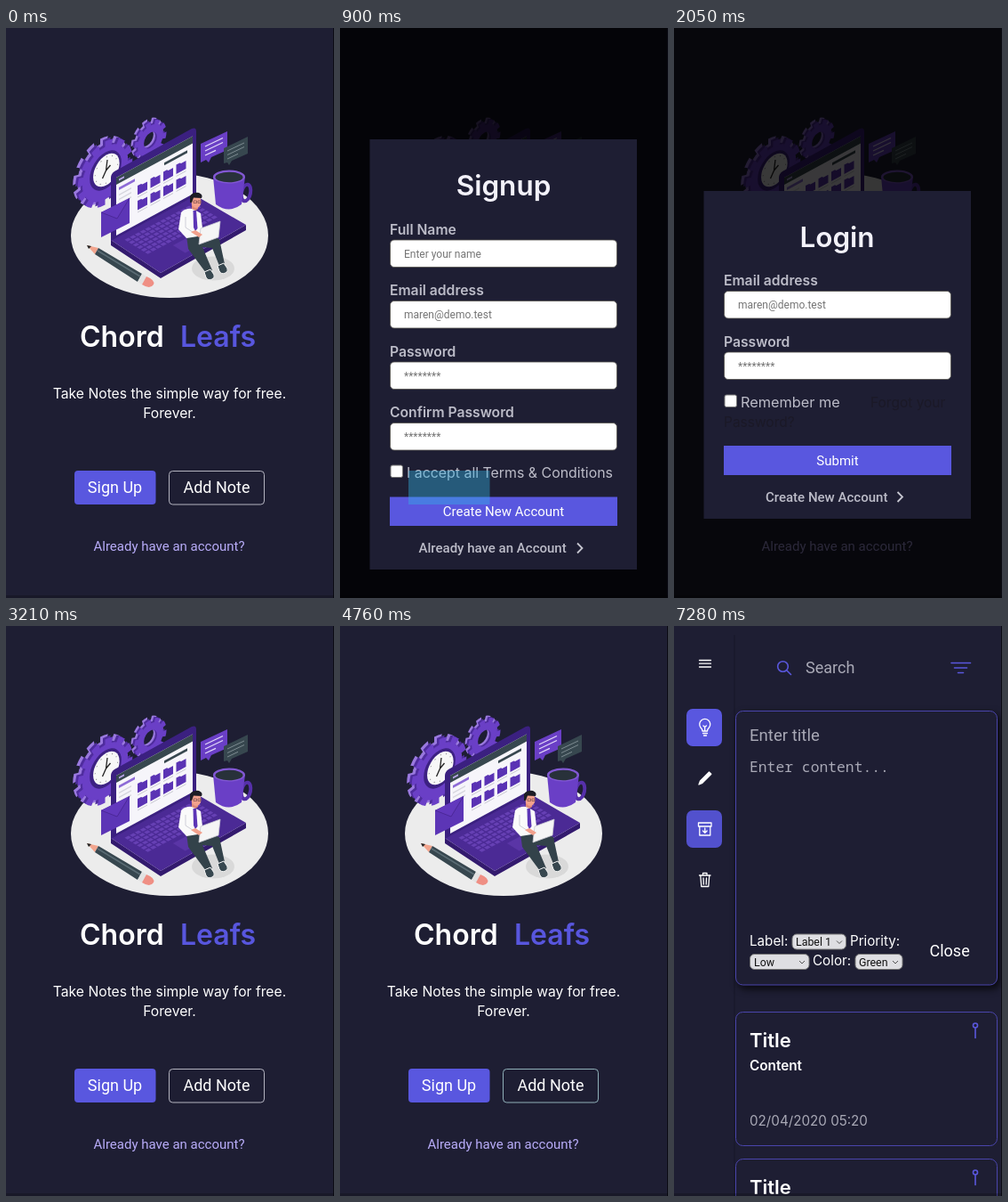
Animation of 369 by 640 pixels, one loop 8000 ms. Source, as an HTML page:

```html
<!DOCTYPE html>
<html lang="en">
<head>
<meta charset="utf-8">
<title>Notes app walkthrough</title>
<style>
html, body { margin: 0; height: 100%; overflow: hidden; background: #1e1e33; }
svg { display: block; width: 100vw; height: 100vh; }
text { font-family: Roboto, sans-serif; fill: #fff; white-space: pre; }
.in { font-family: Inter, sans-serif; }
.b { font-weight: 600; }
.m { font-weight: 500; }
.mid { text-anchor: middle; }
.soft text { fill: #bcbcc8; }
.soft .head { fill: #f3f2fa; font-size: 31.5px; }
.soft .label { font-size: 15.7px; }
.soft .hint { fill: #757575; font-size: 12px; }
.soft .btn { fill: #fff; font-size: 15px; }
.soft .faint { fill: #1b1927; font-size: 15.5px; }
.link { font-size: 15px; }
.card { fill: #1e1e33; stroke: #4a45ac; }
.lift { filter: drop-shadow(3px 4px 4px #000b); }
.line { fill: none; stroke: #fff; stroke-width: 1.3; stroke-linecap: round; stroke-linejoin: round; }
.accent { stroke: #5a57dd; stroke-width: 1.6; }
.opt { font-size: 12.4px; fill: #111; }

/* 8 s timeline; 1% is 80 ms */
.t { animation: 8s step-end infinite; opacity: 0; }
#dim { animation-name: dim; }
#signup { animation-name: signup; }
#login { animation-name: login; }
#tapSign { animation-name: tapSign; }
#tapAdd { animation-name: tapAdd; }
#addBox { animation: addBox 8s step-end infinite; }
#page { animation-name: page; }
#plain { animation-name: plain; }
#icons { animation-name: icons; }
#bar { animation-name: bar; }
#archive { animation-name: archive; }
@keyframes dim {
  11.25% { opacity: .85; animation-timing-function: steps(4); }
  15.25% { opacity: .77; }
  40.125% { opacity: 0; }
}
@keyframes signup { 11.25% { opacity: 1; } 25.625% { opacity: 0; } }
@keyframes login { 25.625% { opacity: 1; } 40.125% { opacity: 0; } }
@keyframes tapSign {
  11.25% { opacity: 1; animation-timing-function: steps(4); }
  15.25% { opacity: 0; }
}
@keyframes tapAdd {
  54.5% { opacity: 1; }
  55.5% { opacity: 1; animation-timing-function: steps(4); }
  59.5% { opacity: 0; }
}
@keyframes addBox { 59.5% { stroke: #9cc0c8; } 74% { stroke: #c4c4d0; } }
@keyframes page { 74% { opacity: 1; } 100% { opacity: 1; } }
@keyframes plain { 74% { opacity: 1; } 76% { opacity: 0; } }
@keyframes icons { 76% { opacity: 1; } 100% { opacity: 1; } }
@keyframes bar { 74% { opacity: 1; } 80% { opacity: .5; } 82% { opacity: 0; } }
@keyframes archive {
  85% { opacity: 0; animation-timing-function: steps(6); }
  91%, 100% { opacity: .9; }
}
</style>
</head>
<body>
<svg viewBox="0 0 369 640" preserveAspectRatio="none">
  <defs>
    <rect id="field" x="56.5" width="255" height="30.5" rx="4.5" fill="#fff" stroke="#55524c" stroke-width=".8"/>
    <rect id="check" x="57" width="13.5" height="13.5" rx="2" fill="#fff" stroke="#767676"/>
    <path id="go" d="M0 0l5.5 5.5-5.5 5.5" fill="none" stroke="#c6c6d0" stroke-width="1.8"/>
    <path id="down" d="M0 0l3 3 3-3" fill="none" stroke="#555"/>
    <g id="bigGear">
      <circle r="29"/>
      <circle r="31.5" fill="none" stroke-width="8" pathLength="24" stroke-dasharray="1.1 .9"/>
    </g>
    <g id="ringGear" fill="none">
      <circle r="12.500" stroke-width="8"/>
      <circle r="18" stroke-width="5.500" pathLength="20" stroke-dasharray="1.1 .9"/>
    </g>
    <path id="folder" d="M0 1h4l1.5 1.5h5.5v9h-11z" fill="#5a33b4"/>
    <path id="shoe" d="M0 2l7-3 4 6q1 3-2 5-5 2-7-2z" fill="#37474f" stroke="#f4f4f4"/>
    <g id="note">
      <rect class="card" x="69.5" y="433.5" width="294" height="150" rx="8"/>
      <text class="in b" x="85" y="473" font-size="22">Title</text>
      <text class="in b" x="85" y="499" font-size="15.3">Content</text>
      <text class="in" x="85" y="561" font-size="15.2" style="fill:#a9a9b6">02/04/2020 05:20</text>
    </g>
    <g id="pin" class="line accent"><circle cx="339" cy="448.5" r="2.5"/><path d="M339 451v11.5"/></g>
    <clipPath id="rail"><path d="M0 0h54v640h-54z"/></clipPath>
  </defs>

  <rect width="369" height="640" fill="#1e1e33"/>

  <g id="art">
    <ellipse cx="184" cy="233" rx="111" ry="70" fill="#ececec"/>

    <!-- gears share the slanted plane of the screen -->
    <g fill="#9a79df" stroke="#9a79df">
      <use href="#bigGear" transform="matrix(.87 -.47 0 1 106 160)"/>
      <use href="#ringGear" transform="matrix(.87 -.47 0 1 158.500 123.500)"/>
    </g>
    <g fill="#4f2c9e" stroke="#4f2c9e">
      <use href="#bigGear" transform="matrix(.87 -.47 0 1 109 161.500)"/>
      <use href="#ringGear" transform="matrix(.87 -.47 0 1 160.500 125)"/>
    </g>
    <g fill="#6a3fc6" stroke="#6a3fc6">
      <use href="#bigGear" transform="matrix(.87 -.47 0 1 111.500 163)"/>
      <use href="#ringGear" transform="matrix(.87 -.47 0 1 162.500 126)"/>
    </g>
    <g transform="matrix(.87 -.47 0 1 112 160)">
      <circle r="20.500" fill="#3d2183"/>
      <circle cx="1" r="17" fill="#f7f7f7"/>
      <circle cx="1" r="14.500" fill="none" stroke="#777" pathLength="24" stroke-dasharray=".3 1.7"/>
    </g>
    <path d="M114 148l-1.500 12-4 9M112.500 160l5-6" fill="none" stroke="#222" stroke-width="1.3"/>

    <path d="M118 238L174 275V281L118 244zM174 275L270 221V227L174 281z" fill="#331a6e"/>
    <path d="M118 238L213 188 270 221 174 275z" fill="#4b2a95"/>
    <g transform="matrix(.95 -.5 .57 .35 118 238)">
      <path d="M9 15H92M9 23H92M9 31H92M9 39H92M9 47H92M9 55H92" stroke="#6640b4" stroke-width="5.5" stroke-dasharray="4.500 1.500"/>
      <path d="M34 66h34v24h-34z" fill="#5a35a6"/>
    </g>
    <path d="M118 168Q118 164 122 161L209 113Q214 111 214 116V188L118 239z" fill="#3b2080"/>
    <g transform="matrix(1 -.54 0 1 124 168)">
      <path d="M0 0h86v65h-86z" fill="#f6f5fa"/>
      <path d="M0 0h86v8h-86z" fill="#37474f"/>
      <path d="M3 4h6" stroke="#b9a5e8" stroke-width="2"/>
      <path d="M3 14h18" stroke="#8d6bd6" stroke-width="3"/>
      <path d="M54 14h26" stroke="#37474f" stroke-width="3"/>
      <path d="M3 21h14M3 26h14M3 31h14" stroke="#d5d5dd" stroke-width="1.5"/>
      <use href="#folder" x="24" y="21"/><use href="#folder" x="38.5" y="21"/>
      <use href="#folder" x="53" y="21"/><use href="#folder" x="67.5" y="21"/>
      <use href="#folder" x="24" y="38"/><use href="#folder" x="38.5" y="38"/>
      <use href="#folder" x="53" y="38"/><use href="#folder" x="67.5" y="38"/>
      <path d="M24 35h55M24 52h55" stroke="#c8c8d0" stroke-dasharray="11 3.5"/>
    </g>
    <path d="M107 207L139 191V219L107 235z" fill="#5c35b6"/>
    <path d="M107 207L125 214 139 191" fill="#6238bd" stroke="#472590" stroke-width=".8"/>

    <path d="M219 130L249 116V137L231 145 228 151 225 148 219 151z" fill="#6a3fc6"/>
    <path d="M224 133l20-9.5M224 138l20-9.5M224 143l12-5.700" stroke="#e2d8f8" stroke-width="1.3"/>
    <path d="M245 135L272 122V141L254 149 251 154 249 151 245 152z" fill="#37474f"/>
    <path d="M249 138l19-9M249 142.5l19-9M249 147l12-5.700" stroke="#7d8b91"/>

    <ellipse cx="270" cy="185" rx="5" ry="9.5" transform="rotate(12 270 185)" fill="none" stroke="#5630aa" stroke-width="4"/>
    <path d="M233 167L236 198Q251 209 265 198L269 167z" fill="#6a3fc6"/>
    <ellipse cx="251" cy="167" rx="18" ry="7.5" fill="#8258d4"/>
    <ellipse cx="251" cy="167.500" rx="15.5" ry="5.8" fill="#28313a"/>

    <path d="M91 244L104 247 100 254z" fill="#f2a58e"/>
    <path d="M91 244l5 1-3 3z" fill="#222"/>
    <path d="M104 247L153 276 148 285 100 254z" fill="#37474f"/>
    <path d="M103 250L151 279" stroke="#5b6d75" stroke-width="1.5"/>
    <path d="M153 276l5 3-5 9-5-3z" fill="#e2e2e2"/>
    <path d="M158 279Q168 283 166 288 162 294 153 288z" fill="#ef8f84"/>

    <ellipse cx="233" cy="270" rx="24" ry="13.5" fill="#d9d9d9"/>
    <path d="M203 233L222 231 240 237 246 265 240 267 232 247 221 246 232 272 225 275 205 248z" fill="#33424a"/>
    <use href="#shoe" x="238" y="265"/><use href="#shoe" x="223" y="272"/>
    <path d="M197 207Q202 202 210 203L219 208 222 233 203 236 194 226z" fill="#fafafa"/>
    <path d="M202 212L202 224 213 231" fill="none" stroke="#cfcfd8"/>
    <path d="M210.500 205l3.500 0 1.500 20-2.500 3-2-4z" fill="#5c35b6"/>
    <path d="M209 198h7v5l-3 2-4-2z" fill="#dd8878"/>
    <ellipse cx="214" cy="195" rx="5.5" ry="7" fill="#f2a18d"/>
    <path d="M207 196V189Q210 184 217 185 222 187 220 191L211 190.500 209 196z" fill="#1c1c24"/>
    <path d="M211 194h3.500v2.500h-3.500zM216 194h3v2.500h-3z" fill="none" stroke="#4a2a30" stroke-width=".5"/>
    <path d="M219 225L241 217 239 235 217 243z" fill="#f5f5f5" stroke="#c9c9d2" stroke-width=".8"/>
    <path d="M208 229l9 6 4-3-8-5z" fill="#f2a18d"/>
  </g>

  <text class="in b" x="83" y="358" font-size="32">Chord</text>
  <text class="in b" x="196" y="358" font-size="32" style="fill:#5856de">Leafs</text>
  <g class="mid" font-size="15.7">
    <text class="in" x="184" y="416">Take Notes the simple way for free.</text>
    <text class="in" x="184" y="438">Forever.</text>
  </g>
  <rect x="77" y="497" width="91.5" height="38" rx="4" fill="#5957df"/>
  <rect id="addBox" x="183.5" y="497.5" width="107" height="37.5" rx="4" fill="none" stroke="#c4c4d0" stroke-width=".9"/>
  <g class="mid">
    <text x="122.5" y="522" font-size="18">Sign Up</text>
    <text x="237" y="522" font-size="18">Add Note</text>
    <text class="link" x="183.5" y="587" style="fill:#b8acf8">Already have an account?</text>
  </g>
  <rect id="tapAdd" class="t" x="183" y="497" width="108" height="38" fill="#33b5e5" fill-opacity=".4"/>

  <rect id="dim" class="t" width="369" height="640"/>

  <g id="signup" class="t soft">
    <path d="M33.5 125h300.5v483h-300.5z" fill="#1e1e33"/>
    <text class="in b head mid" x="184" y="188">Signup</text>
    <text class="in b label" x="56" y="231.5">Full Name</text>
    <text class="in b label" x="56" y="300">Email address</text>
    <text class="in b label" x="56" y="368.5">Password</text>
    <text class="in b label" x="56" y="437">Confirm Password</text>
    <use href="#field" y="238"/><use href="#field" y="306.5"/>
    <use href="#field" y="375"/><use href="#field" y="443.5"/>
    <text class="hint" x="72" y="257.5">Enter your name</text>
    <text class="hint" x="72" y="326">maren@demo.test</text>
    <text class="hint" x="72" y="394.5">********</text>
    <text class="hint" x="72" y="463">********</text>
    <use href="#check" y="491"/>
    <text class="in" x="75" y="505" font-size="15.9">I accept all Terms &amp; Conditions</text>
    <path d="M56 526.5h256v32.5h-256z" fill="#5957df"/>
    <text class="btn mid" x="184" y="548">Create New Account</text>
    <text class="link m" x="88.5" y="589">Already have an Account</text>
    <use href="#go" x="267" y="578.5"/>
  </g>

  <g id="login" class="t soft">
    <path d="M33.5 183h300.5v368h-300.5z" fill="#1e1e33"/>
    <text class="in b head mid" x="183.5" y="245.5">Login</text>
    <text class="in b label" x="56" y="289">Email address</text>
    <text class="in b label" x="56" y="357.5">Password</text>
    <use href="#field" y="295.5"/><use href="#field" y="364"/>
    <text class="hint" x="72" y="315">maren@demo.test</text>
    <text class="hint" x="72" y="383.5">********</text>
    <use href="#check" y="412"/>
    <text class="in" x="75" y="426" font-size="16.3">Remember me</text>
    <text class="in faint" x="221" y="426">Forgot your</text>
    <text class="in faint" x="56" y="448">Password?</text>
    <path d="M56 469h256v33h-256z" fill="#5957df"/>
    <text class="btn mid" x="184" y="491">Submit</text>
    <text class="link m" x="103" y="532">Create New Account</text>
    <use href="#go" x="251.5" y="521"/>
  </g>

  <rect id="tapSign" class="t" x="77" y="497" width="91.5" height="38" fill="#33b5e5" fill-opacity=".4"/>

  <g id="page" class="t">
    <rect width="369" height="640" fill="#1e1e33"/>
    <path d="M67 10h2v630h-2z" fill="#1a1a2d"/>
    <rect class="card lift" x="69.5" y="95.5" width="294" height="307.5" rx="8"/>
    <text x="85" y="128.5" font-size="18.6" style="fill:#a9a9b6">Enter title</text>
    <text x="85" y="163.5" font-size="16.35" style="fill:#a9a9b6;font-family:'Noto Sans Mono',monospace">Enter content...</text>
    <g font-size="15.2">
      <text class="in" x="85" y="359">Label:</text>
      <text class="in" x="198" y="359">Priority:</text>
      <text class="in" x="156" y="381">Color:</text>
    </g>
    <g fill="#dedee2" stroke="#777">
      <rect x="133" y="346" width="60.5" height="17" rx="5"/>
      <rect x="85.5" y="368.5" width="66.5" height="17" rx="5"/>
      <rect x="204" y="368.5" width="53" height="17" rx="5"/>
    </g>
    <text class="opt" x="137" y="359">Label 1</text>
    <text class="opt" x="90" y="381.5">Low</text>
    <text class="opt" x="208" y="381.5">Green</text>
    <use href="#down" x="183" y="353.5"/><use href="#down" x="141" y="376"/><use href="#down" x="246" y="376"/>
    <text x="287.5" y="371" font-size="18">Close</text>
    <use href="#note"/><use href="#note" y="165"/>
  </g>

  <g id="plain" class="t">
    <text x="141" y="53" font-size="18" style="fill:#a9a9b6">Search</text>
    <rect x="14" y="80" width="40" height="42" rx="7" fill="#5957df"/>
    <g clip-path="url(#rail)" font-size="13">
      <text class="in b" x="36.5" y="41.5" font-size="18">Chord Leafs</text>
      <text class="in" x="37" y="105">Notes</text>
      <text class="in" x="37" y="219">Archive</text>
      <text class="in" x="37" y="276">Trash</text>
    </g>
  </g>

  <g id="icons" class="t">
    <text x="148" y="53" font-size="18" style="fill:#a9a9b6">Search</text>
    <g class="line accent">
      <circle cx="122.5" cy="45.5" r="5.8"/><path d="M127 50l4.5 4.5"/>
      <path d="M312 41.5h21.5M315.5 47h14M319.5 52.5h6"/>
    </g>
    <use href="#pin"/><use href="#pin" y="165"/>
    <rect x="14" y="93" width="40" height="42" rx="7" fill="#5957df"/>
    <rect id="archive" class="t" x="14" y="207" width="40" height="42" rx="7" fill="#5957df"/>
    <g class="line">
      <path d="M28.5 38.5h13M28.5 42.2h13M28.5 46h13"/>
      <path d="M32 118q0-2-2-4a6 6 0 1 1 9.5 0q-2 2-2 4zM32.5 120.5h5M33.5 123h3M33 112l1.7 1.5 1.7-1.5M34.7 113.5v4"/>
      <path d="M28 178l1.5-4 10-10 2.3 2.3-10 10z" fill="#fff"/>
      <path d="M27.5 221h14.5v4h-14.5zM28.8 225v10h12v-10M34.8 227v5M32.5 230l2.3 2.3 2.3-2.3"/>
      <path d="M28.5 280h12.5M32.5 280v-2.5h4.5v2.5M29.8 280l1 12.5h8l1-12.5M33 283l.3 7M36.5 283l-.3 7"/>
    </g>
  </g>
  <rect id="bar" class="t" x="365" width="3" height="407" fill="#4b4b5c"/>

  <path d="M368 0h1v640h-1z" fill="#0b0b14"/>
  <path d="M0 637h369v3h-369z" fill="#000" opacity=".2"/>
</svg>
</body>
</html>
```
